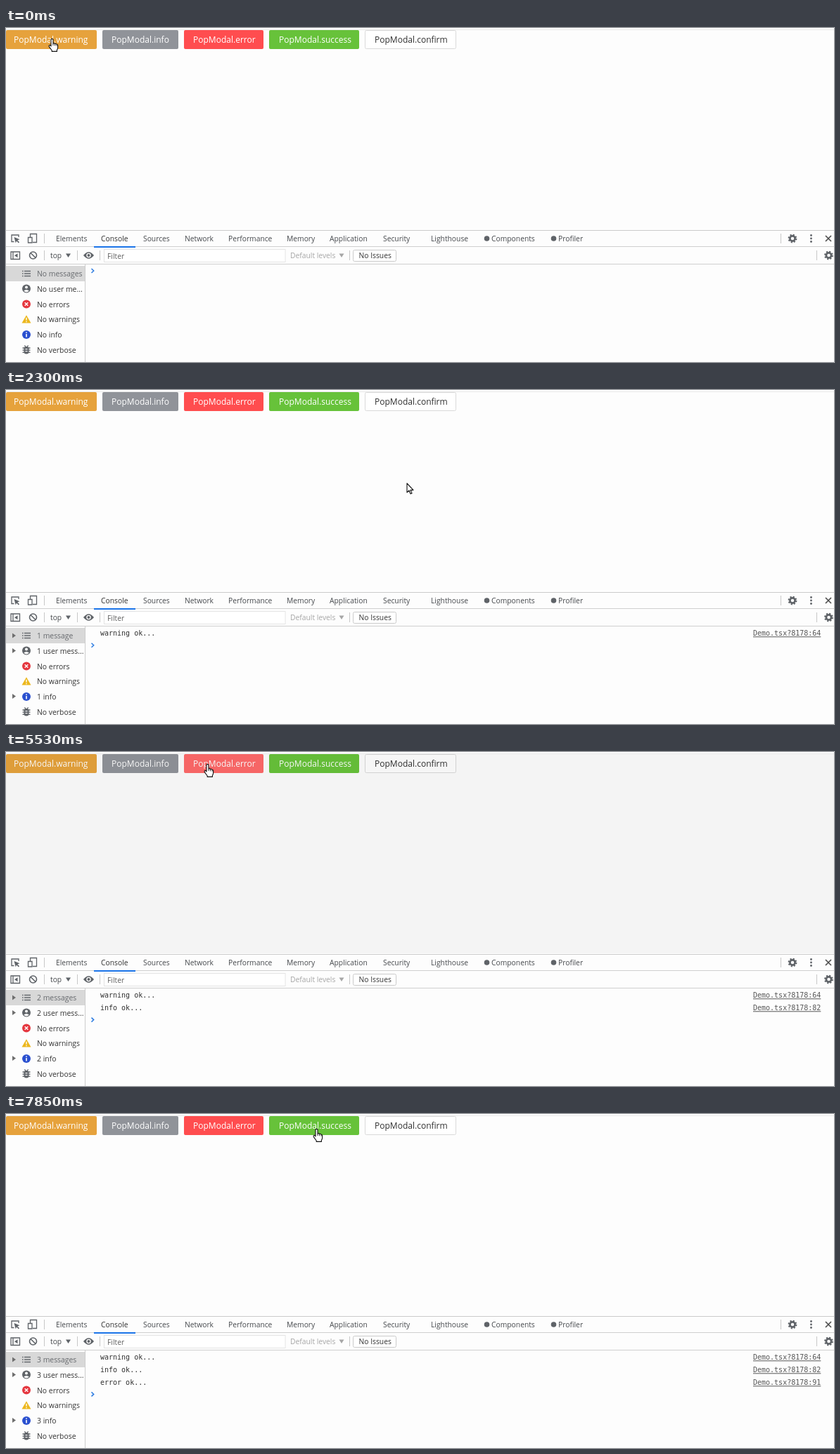
Animation of 1177x476 px, one loop 8000 ms. Source, as an HTML page:

```html
<!DOCTYPE html>
<html lang="en">
<head>
<meta charset="utf-8">
<title>PopModal demo</title>
<style>
  html, body { margin: 0; width: 100%; height: 100%; overflow: hidden; background: #fdfdfd; }
  svg { position: absolute; left: 0; top: 0; overflow: visible; }
  text { white-space: pre; font-family: "Open Sans", "Noto Sans CJK SC", "Noto Sans CJK JP", "Noto Sans CJK", sans-serif; }
  .mono { font-family: "DejaVu Sans Mono", monospace; }
  #shade { position: absolute; left: 0; top: 3px; width: 1177px; height: 284px; background: #000; }
  #modal {
    position: absolute; left: 420px; top: 85.5px; width: 342px; height: 128.5px;
    background: #fff; border-radius: 2px;
    box-shadow: 0 3px 5px -3px rgba(0,0,0,.12), 0 5px 14px rgba(0,0,0,.08), 0 8px 25px 7px rgba(0,0,0,.05);
  }
</style>
</head>
<body>
<svg id="base" width="1177" height="476"></svg>
<div id="shade"></div>
<svg id="buttons" width="1177" height="32"></svg>
<div id="modal"><svg id="dialog" width="342" height="128.5" viewBox="420 85.5 342 128.5"></svg></div>
<svg id="pointer" width="1177" height="476"></svg>
<script>
const LOOP = 8000;
const INK = '#46494d', ICON = '#5f6368';
const $ = id => document.getElementById(id);

const text = (x, y, str, size = 10.3, fill = INK, extra = '') =>
  `<text x="${x}" y="${y}" font-size="${size}" fill="${fill}" ${extra}>${str}</text>`;
const rect = (x, y, w, h, fill, extra = '') =>
  `<rect x="${x}" y="${y}" width="${w}" height="${h}" fill="${fill}" ${extra}/>`;
const line = (d, stroke = ICON, width = 1.3) =>
  `<path d="${d}" fill="none" stroke="${stroke}" stroke-width="${width}"/>`;
const shape = (d, fill = ICON) => `<path d="${d}" fill="${fill}"/>`;
const disc = (x, y, r, fill = ICON) => `<circle cx="${x}" cy="${y}" r="${r}" fill="${fill}"/>`;
const ring = (x, y, r, width, stroke = ICON, extra = '') =>
  `<circle cx="${x}" cy="${y}" r="${r}" fill="none" stroke="${stroke}" stroke-width="${width}" ${extra}/>`;
const divider = (x, y) => rect(x, y - 7, 1, 14, '#c8c8c8');
const gear = (x, y) => ring(x, y, 3.6, 2.7) + ring(x, y, 5.4, 2, ICON, 'stroke-dasharray="2.12"');

// ---- static page and developer tools ----
function drawBase() {
  const tabs = [[71, 'Elements'], [135, 'Console'], [195, 'Sources'], [254, 'Network'],
    [316, 'Performance'], [399, 'Memory'], [460, 'Application'], [536, 'Security'],
    [604, 'Lighthouse'], [690, 'Components'], [785, 'Profiler']];
  const page = rect(0, 2, 1177, 1, '#e8e8e8') +
    rect(510.5, 3.5, 129, 26, '#fff', 'rx="2" stroke="#d9d9d9"') +
    text(524, 20.7, 'PopModal.confirm', 12, '#303030');

  const tabRow = rect(0, 288, 1177, 1, '#cbcbcb') + rect(0, 311, 1177, 1, '#cfcfcf') +
    rect(125, 311, 59, 2, '#1a73e8') +
    tabs.map(([x, name]) => text(x, 304, name, 10.3, name === 'Console' ? '#303030' : INK)).join('') +
    disc(683.5, 300, 3.8) + disc(778.5, 300, 3.8) +
    line('M11.5 304.5H8V295H18V298') + shape('M11.5 298L19.5 301.2L16.3 302.5L19 305.2L17.8 306.4L15.1 303.6L13.8 306.5Z') +
    line('M34.5 298V293.5H43.5V305.5H38') + line('M31.5 298.5H37V306H31.5Z') +
    divider(54, 300) + divider(1101, 300) + gear(1118, 300) +
    [295.5, 300, 304.5].map(y => disc(1144.5, y, 1.4)).join('') +
    line('M1165 296L1173 304M1173 296L1165 304', '#4a4a4a', 1.6);

  const filterRow = rect(0, 336, 1177, 1, '#cfcfcf') +
    line('M7 319H19.5V329.5H7ZM10 319V329.5') + shape('M16.5 321.2V327.3L12 324.2Z') +
    ring(38.5, 324, 5, 1.6) + line('M35 320.5L42 327.5', ICON, 1.6) +
    divider(54, 324) + text(63, 328, 'top') + shape('M85 321.5H92L88.5 327Z') + divider(101, 324) +
    shape('M110 324Q117.5 314.5 125 324Q117.5 333.5 110 324Z') + ring(117.5, 324, 2.6, 1.3, '#fdfdfd') +
    divider(133, 324) + rect(139.5, 315.5, 257.5, 18, '#fff', 'stroke="#e4e4e4"') +
    text(144, 328.6, 'Filter', 10.3, '#606060') + text(404, 328, 'Default levels', 10.3, '#a6a6a6') +
    shape('M473.5 321.5H480.5L477 327Z', '#a6a6a6') + divider(488, 324) +
    rect(493.5, 316.5, 61, 16, '#fff', 'rx="2" stroke="#cacaca"') + text(501.5, 328.3, 'No Issues', 10.3, '#333') +
    divider(1152, 324) + gear(1169.5, 324);

  const sidebar = rect(0, 339, 112, 22, '#d8d8d8') + rect(112, 337, 1, 139, '#cccccc') +
    [346.5, 350, 353.5].map(y => rect(23, y - .7, 1.6, 1.4, ICON) + rect(26, y - .7, 9, 1.4, ICON)).join('') +
    disc(29, 371.5, 6) + disc(29, 369.4, 2, '#fdfdfd') + shape('M25.2 374.5Q29 371.3 32.8 374.5Q29 378.3 25.2 374.5Z', '#fdfdfd') +
    disc(29, 393.5, 6, '#e5373f') + line('M26.7 391.2L31.3 395.8M31.3 391.2L26.7 395.8', '#fff', 1.4) +
    shape('M29 409.2L35.5 420.5H22.5Z', '#ecb71c') + line('M29 412.8V416.6M29 417.8V419.2', '#fff', 1.4) +
    disc(29, 437, 6, '#2a50cf') + line('M29 433.2V434.8M29 436V440.6', '#fff', 1.6) +
    rect(25.5, 454, 7, 10.5, ICON, 'rx="3"') +
    line('M23.5 456H34.5M23.5 459.2H34.5M23.5 462.4H34.5M26.4 452.4L28 454.4M31.6 452.4L30 454.4') +
    line('M27.5 457.6H30.5M27.5 460.6H30.5', '#fdfdfd', 1.2);

  $('base').innerHTML = page + tabRow + filterRow + sidebar + '<g id="log"></g>';
}

const topButtons = [
  [0, 129, 11, 'warning', '#e6a23c'], [137, 108, 150, 'info', '#909399'],
  [253, 113, 266, 'error', '#ff4d4f'], [374, 128, 388, 'success', '#67c23a']];

function drawButtons() {
  $('buttons').innerHTML = topButtons.map(([x, w, tx, name, color]) =>
    rect(x, 3, w, 27, color, `rx="2" id="btn-${name}"`) +
    text(tx, 20.7, 'PopModal.' + name, 12, '#fff')).join('');
}

// ---- console ----
const popups = [
  { open: 450, close: 2010, from: [65, 20], title: 'warning', body: '是否确认删除?', color: '#faad14', where: 64,
    mark: 'M455 116.3V122.3M455 123.8V125.6' },
  { open: 3143, close: 4690, from: [205, 19], title: 'info', body: '温馨提示', color: '#1890ff', where: 82,
    mark: 'M455 116.4V118.2M455 119.7V125.6' },
  { open: 5528, close: 7250, from: [286, 19], title: 'error', body: '不可删除', color: '#ff4d4f', where: 91,
    mark: 'M452 118L458 124M458 118L452 124' }];

function drawLog(count) {
  const n = count || 'No';
  const labels = [
    [354, n + (count === 1 ? ' message' : ' messages'), '#66696d'],
    [375.5, n + (count ? ' user mess...' : ' user me...')],
    [397.8, 'No errors'], [419.3, 'No warnings'], [441, n + ' info'], [462.8, 'No verbose']];
  const arrows = count ? [350, 371.5, 436.5].map(y => shape(`M9 ${y - 3.5}V${y + 3.5}L14 ${y}Z`, '#6e6e6e')).join('') : '';
  const rows = popups.slice(0, count).map((p, i) =>
    text(134, 350.3 + 18 * i, p.title + ' ok...', 10, '#303030', 'class="mono"') +
    text(1062, 350.3 + 18 * i, 'Demo.tsx?8178:' + p.where, 10, '#555', 'class="mono" text-decoration="underline"')).join('');
  const y = 346 + 17.8 * count;
  $('log').innerHTML = labels.map(([ty, str, fill = '#333']) => text(44, ty, str, 10.4, fill)).join('') +
    arrows + rows + line(`M121.5 ${y - 3}L124.7 ${y}L121.5 ${y + 3}`, '#2f7de1', 1.5);
}

function drawDialog(p) {
  $('dialog').innerHTML = ring(455, 121, 8.4, 1.6, p.color) + line(p.mark, p.color, 1.6) +
    text(477.3, 126, p.title, 13.5, '#262626') + text(477.3, 149.8, p.body, 11.6, '#303030') +
    rect(696, 175, 40, 19.5, '#40a4ff', 'rx="2"') + text(703, 189, '确 定', 11.6, '#fff', 'font-weight="500"');
  $('modal').style.transformOrigin = `${p.from[0] - 420}px ${p.from[1] - 85.5}px`;
}

// ---- motion ----
const clamp = v => Math.min(1, Math.max(0, v));

function bezier(x1, y1, x2, y2) {
  const at = (a, b, u) => 3 * (1 - u) ** 2 * u * a + 3 * (1 - u) * u * u * b + u ** 3;
  return x => {
    x = clamp(x);
    if (x === 0 || x === 1) return x;
    let lo = 0, hi = 1;
    for (let i = 0; i < 24; i++) {
      const mid = (lo + hi) / 2;
      if (at(x1, x2, mid) < x) lo = mid; else hi = mid;
    }
    return at(y1, y2, lo);
  };
}
const zoomIn = bezier(.08, .82, .17, 1), zoomOut = bezier(.78, .14, .15, .86);

// The screen refreshes in bursts: [first, last, steps].
const bursts = [[500, 1460, 7], [1610, 2600, 8], [2750, 2900, 2], [3210, 4200, 8], [4320, 4320, 1],
  [4720, 5680, 8], [5800, 5800, 1], [6200, 6980, 7], [7280, 7850, 5]];

function snap(t) {
  const burst = bursts.filter(b => b[0] <= t).pop();
  if (!burst) return 0;
  const [first, last, steps] = burst;
  const step = (last - first) / (steps - 1) || 1;
  return first + step * Math.min(steps - 1, Math.floor((t - first) / step + .12));
}

const track = [[0, 65, 15], [820, 65, 15], [1610, 719, 177], [2160, 719, 177], [2600, 209, 26],
  [2750, 207, 22], [2900, 206, 19], [3450, 206, 19], [4200, 713, 186], [4320, 711, 186],
  [4850, 711, 186], [5400, 286, 17], [5800, 286, 17], [6200, 532, 180], [6980, 713, 192],
  [7400, 713, 192], [7850, 441, 21], [LOOP, 441, 21]];

function pointerAt(t) {
  const i = track.findIndex((k, j) => j && t <= k[0]);
  const [t0, x0, y0] = track[i - 1], [t1, x1, y1] = track[i];
  const u = (t - t0) / (t1 - t0), e = u * u * (3 - 2 * u);
  return [x0 + (x1 - x0) * e, y0 + (y1 - y0) * e];
}

const outlined = d => `<path d="${d}" fill="#fff" stroke="#111" stroke-width="1.1" stroke-linejoin="round"/>`;
const arrow = outlined('M0 0V13L3 10.2L5 15L7 14.2L5 9.6H9Z');
const hand = outlined('M-1 1.3Q.5 -.6 2 1.3V7Q3.6 6 4.6 7.5Q6 6.6 7 8.3Q8.6 8 8.6 10V13Q8.6 15 7.4 16.3V18.4H.2V17' +
  'L-3.7 11.6Q-4.4 9.9 -3.2 9.4Q-2.2 9.2 -1 11Z') + line('M2 7V10M4.6 7.6V10.3M7 8.4V10.6', '#111', .9);

let shownCount = -1, shownPopup = null;

function render(now) {
  const t = snap(now % LOOP);
  const popup = popups.filter(p => p.open <= t).pop() || popups[0];
  const count = popups.filter(p => p.close <= t).length;
  const closing = t >= popup.close;
  const fade = closing ? 1 - clamp((t - popup.close) / 200) : clamp((t - popup.open) / 200);
  const zoom = closing ? 1 - zoomOut((t - popup.close) / 300) : zoomIn((t - popup.open - 17) / 300);
  const dim = .45 * fade;

  if (count !== shownCount) drawLog(shownCount = count);
  if (popup !== shownPopup) drawDialog(shownPopup = popup);
  $('shade').style.opacity = dim;
  $('buttons').style.filter = `brightness(${1 - Math.min(dim, .33)})`;
  $('modal').style.opacity = zoom;
  $('modal').style.transform = `scale(${.2 + .8 * zoom})`;

  const [x, y] = pointerAt(t);
  const overTop = y < 30 && x < 640;
  const overOk = x > 696 && x < 736 && y > 175 && y < 195;
  const hover = overTop && x > 253 && x < 366 && fade < 1;
  $('btn-error').setAttribute('fill', hover ? '#ff6a6a' : '#ff4d4f');
  $('pointer').innerHTML = `<g transform="translate(${Math.round(x)} ${Math.round(y)})">${overTop || overOk ? hand : arrow}</g>`;
}

drawBase();
drawButtons();
const start = performance.now();
(function loop() {
  render(performance.now() - start);
  requestAnimationFrame(loop);
})();
</script>
</body>
</html>
```
